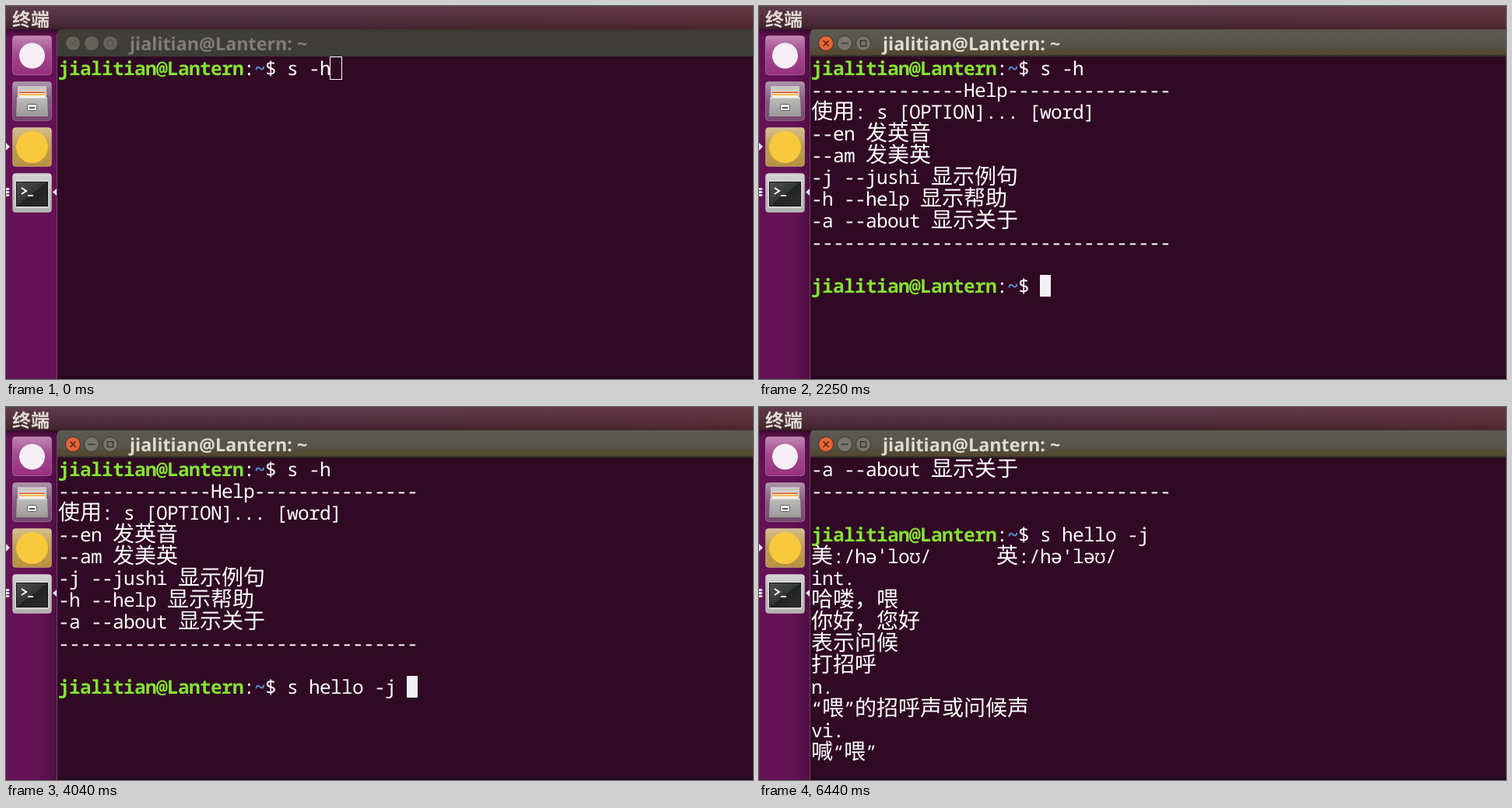
Write an HTML page that moves like this. It is 960 px wide and 480 px high and loops after 9.94 s.

```html
<!DOCTYPE html>
<html lang="zh-CN">
<head>
<meta charset="utf-8">
<title>终端</title>
<style>
html, body { margin: 0; width: 100%; height: 100%; overflow: hidden; background: #300a24; }
svg { display: block; width: 960px; height: 480px; }
text { white-space: pre; text-rendering: geometricPrecision; }
.mono { font: 500 24.5px "Noto Sans Mono", "DejaVu Sans Mono", monospace; letter-spacing: calc(14px - .6em); fill: #fff; }
.user { font-weight: 700; fill: #85e234; }
.path { font-weight: 700; fill: #5c96d6; }
.wide { font: 28px "Noto Sans CJK SC", "Noto Sans CJK", sans-serif; fill: #fff; }
.menu { font: 700 24px "Noto Sans CJK SC", "Noto Sans CJK", sans-serif; fill: #dfdbd2; }
.title { font: 700 23.3px "Noto Sans", "Open Sans", sans-serif; fill: #dfdbd2; }
.btn circle { fill: #77756d; stroke: #3b3a35; }
.btn path { fill: none; stroke: #3b3a35; stroke-width: 1.5; }
.close circle { fill: #e5653a; stroke: #55301f; }
.close path { stroke: #5a2413; }
.idle .title { fill: #807d78; }
.idle .btn circle { fill: #64625b; stroke: #3a3934; }
.idle .btn path { stroke: #585650; }
.idle .live { display: none; }
</style>
</head>
<body>
<svg id="stage" viewBox="0 0 960 480">
  <defs>
    <linearGradient id="panel" x2="0" y2="1">
      <stop stop-color="#603d4d"/><stop offset=".5" stop-color="#52303f"/><stop offset="1" stop-color="#3c222b"/>
    </linearGradient>
    <linearGradient id="warm">
      <stop offset=".4" stop-color="#6b2c34" stop-opacity="0"/><stop offset="1" stop-color="#6b2c34" stop-opacity=".35"/>
    </linearGradient>
    <linearGradient id="barIdle" x2="0" y2="1">
      <stop stop-color="#3a3934"/><stop offset=".2" stop-color="#403f3a"/><stop offset="1" stop-color="#3c3b37"/>
    </linearGradient>
    <linearGradient id="barLive" x2="0" y2="1">
      <stop stop-color="#5b5952"/><stop offset=".65" stop-color="#55534b"/><stop offset=".75" stop-color="#574b35"/><stop offset="1" stop-color="#50462f"/>
    </linearGradient>
    <linearGradient id="side">
      <stop stop-color="#2a0823" stop-opacity="0"/><stop offset="1" stop-color="#2a0823" stop-opacity=".36"/>
    </linearGradient>
    <linearGradient id="drop" x2="0" y2="1">
      <stop stop-color="#1c0517" stop-opacity=".6"/><stop offset="1" stop-color="#1c0517" stop-opacity="0"/>
    </linearGradient>
    <linearGradient id="gloss" x2="0" y2="1">
      <stop stop-color="#fff" stop-opacity=".42"/><stop offset=".45" stop-color="#fff" stop-opacity=".12"/><stop offset="1" stop-color="#fff" stop-opacity="0"/>
    </linearGradient>
    <linearGradient id="drawer" x2="0" y2="1">
      <stop stop-color="#bdbcba"/><stop offset="1" stop-color="#9b9a98"/>
    </linearGradient>
    <linearGradient id="screen" x2="1" y2="1">
      <stop stop-color="#50524f"/><stop offset=".5" stop-color="#343634"/><stop offset=".5" stop-color="#222422"/><stop offset="1" stop-color="#2c2e2c"/>
    </linearGradient>
  </defs>

  <rect width="960" height="480" fill="#300a24"/>
  <rect y="476" width="960" height="4" fill="#260720"/>

  <rect y="30" width="66" height="450" fill="#641255"/>
  <rect class="live" x="40" y="30" width="26" height="450" fill="url(#side)"/>
  <rect y="30" width="66" height="9" fill="url(#drop)"/>
  <rect x="65" y="36" width="1" height="444" fill="#6d4467"/>
  <g id="tiles"></g>

  <circle cx="33.5" cy="64" r="16.5" fill="#f5eef3"/>

  <g>
    <path d="M15 103h37v15h-37z" fill="#c9c7c4"/>
    <path d="M17 109h33v9h-33z" fill="#f2efe9"/>
    <path d="M17 110h33v2h-33z" fill="#dd6a45"/>
    <path d="M17 113h33v2h-33z" fill="#f0b94c"/>
    <path d="M14 118h39l1 24h-41z" fill="url(#drawer)"/>
    <path d="M14 118h39v1h-39z" fill="#dddcda"/>
    <rect x="27.5" y="126.500" width="12" height="8" rx="1" fill="#f0efed" stroke="#5c5a58"/>
    <path d="M30 130h7v2h-7z" fill="#555"/>
  </g>

  <circle cx="33.5" cy="181.500" r="20.500" fill="#f8c93c"/>

  <g>
    <rect x="11.500" y="224" width="44" height="36" rx="2" fill="#d6d6d4"/>
    <rect x="13.500" y="226.500" width="40" height="31" fill="url(#screen)" stroke="#151615"/>
    <path d="M20 234l6 4l-6 4M28 244h7" fill="none" stroke="#fff" stroke-width="2"/>
  </g>

  <g fill="#e9e4e8">
    <path d="M0 176l5 5l-5 5zM65 235l-5 4.500l5 4.500z"/>
    <path d="M0 234h3l2 1.500l-2 1.500h-3zM0 238h3l2 1.500l-2 1.500h-3zM0 242h3l2 1.500l-2 1.500h-3z"/>
  </g>

  <path d="M66 65v-30q0-5 5-5h889v35z" fill="url(#barIdle)"/>
  <g class="live">
    <path d="M66 65v-30q0-5 5-5h889v35z" fill="url(#barLive)"/>
    <path d="M66 64h894" stroke="#37342c" stroke-width="2"/>
  </g>
  <g class="btn close"><circle cx="86" cy="48" r="9.500"/><path d="M82.500 44.500l7 7m0-7l-7 7"/></g>
  <g class="btn"><circle cx="110" cy="48" r="9.500"/><path class="live" d="M105.500 48h9"/></g>
  <g class="btn"><circle cx="134" cy="48" r="9.500"/><path d="M130.500 44.500h7v7h-7z"/></g>
  <text id="title" class="title" x="159" y="57"></text>

  <rect width="960" height="30" fill="url(#panel)"/>
  <rect width="960" height="30" fill="url(#warm)"/>
  <text class="menu" x="8" y="26">终端</text>

  <g id="screenText"></g>
  <rect id="cursor"/>
</svg>
<script>
const $ = id => document.getElementById(id);
const USER = 'jialitian@Lantern';
const CELL = 14, ROW = 28, LEFT = 67, TOP = 66, BASE = 23, LOOP = 9940;

function add(parent, tag, attrs, text = '') {
  const el = document.createElementNS(parent.namespaceURI, tag);
  for (const k in attrs) el.setAttribute(k, attrs[k]);
  el.textContent = text;
  parent.append(el);
}

['#96307f', '#75486d', '#b8923f', '#b5b3b2'].forEach((fill, i) => {
  const box = { x: 8.5, y: 38.5 + 59 * i, width: 50, height: 50, rx: 4 };
  add($('tiles'), 'rect', { ...box, fill });
  add($('tiles'), 'rect', { ...box, fill: 'url(#gloss)', stroke: '#fff', 'stroke-opacity': .25 });
});
$('title').textContent = USER + ': ~';

const RULE = '-'.repeat(33);
const ABOUT = '-a --about 显示关于';
const help = [
  '$ s -h',
  '-'.repeat(14) + 'Help' + '-'.repeat(15),
  '使用: s [OPTION]... [word]',
  '--en 发英音',
  '--am 发美英',
  '-j --jushi 显示例句',
  '-h --help 显示帮助',
  ABOUT, RULE, ''
];
const result = [
  ABOUT, RULE, '', '$ s hello -j',
  '美:/həˈloʊ/      英:/hə\'ləʊ/',
  'int.', '哈喽，喂', '你好，您好', '表示问候', '打招呼',
  'n.', '“喂”的招呼声或问候声', 'vi.', '喊“喂”'
];
const first = ['$ s -h'];
const typed = cmd => [...help, '$ ' + cmd];
const hello = typed('s hello -j');

// start time, lines, cursor [column, row]
const steps = [
  [0, first, [25, 0]],
  [980, first, [25, 0]],
  [1580, first],
  [1680, first, [25, 0]],
  [1720, first, [0, 1]],
  [2250, typed(''), [21, 10]],
  [2290, typed('')],
  [2740, typed(''), [21, 10]],
  [2790, typed('s -h'), [25, 10]],
  [3030, typed('clear'), [26, 10]],
  [3600, typed('clear')],
  [3650, typed('clear'), [26, 10]],
  [3700, typed('s -h'), [25, 10]],
  [4040, hello, [32, 10]],
  [4620, hello],
  [5210, hello, [32, 10]],
  [5250, hello, [0, 11]],
  [5800, hello],
  [6440, result]
];

function put(text, cls, col, row) {
  add($('screenText'), 'text', { class: cls, x: LEFT + col * CELL, y: TOP + row * ROW + BASE }, text);
}

function drawLine(line, row) {
  let col = 0;
  if (line.startsWith('$')) {
    put(USER, 'mono user', 0, row);
    put(':', 'mono', 17, row);
    put('~', 'mono path', 18, row);
    col = 19;
  }
  for (const [run] of line.matchAll(/[\u3000-\uffef]+| +|[^ \u3000-\uffef]+/g)) {
    const wide = run[0] >= '\u3000';
    if (run[0] !== ' ') put(run, wide ? 'wide' : 'mono', col, row);
    col += run.length * (wide ? 2 : 1);
  }
}

function drawCursor(pos, idle) {
  const c = $('cursor');
  c.style.display = pos ? '' : 'none';
  if (!pos) return;
  const grow = idle ? .5 : 0;
  const attrs = {
    x: LEFT + pos[0] * CELL - grow, y: TOP + pos[1] * ROW - grow,
    width: CELL + 2 * grow, height: ROW + 2 * grow,
    fill: idle ? 'none' : '#f1f1f3', stroke: idle ? '#fff' : 'none'
  };
  for (const k in attrs) c.setAttribute(k, attrs[k]);
}

let shown = -1;
function show(now) {
  const t = now % LOOP;
  const i = steps.findLastIndex(s => s[0] <= t);
  if (i !== shown) {
    const [, lines, pos] = steps[shown = i];
    $('stage').classList.toggle('idle', i === 0);
    $('screenText').replaceChildren();
    lines.forEach(drawLine);
    drawCursor(pos, i === 0);
  }
}

const start = performance.now();
function tick() {
  show(performance.now() - start);
  requestAnimationFrame(tick);
}
tick();
</script>
</body>
</html>
```
